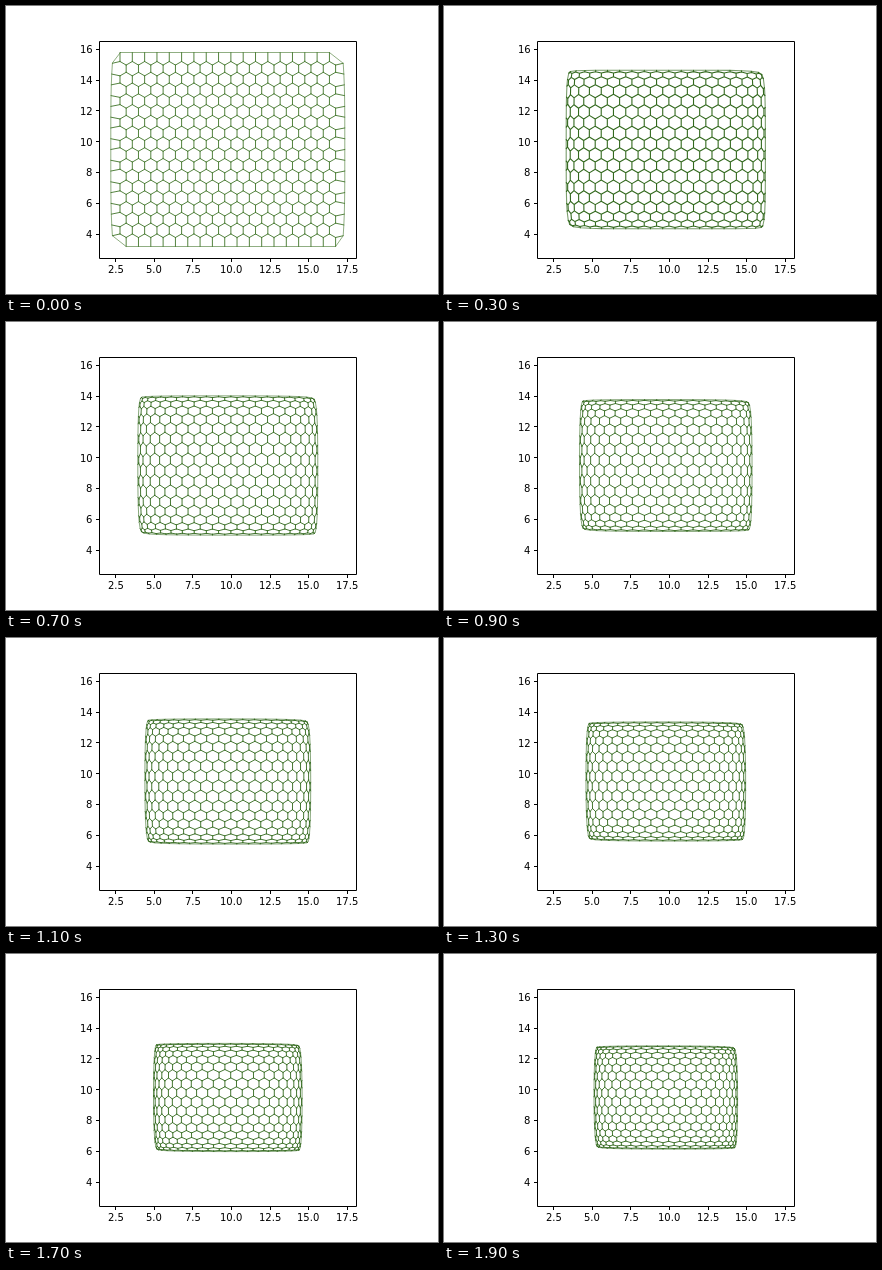
An HTML page with a canvas that plays this animation: 432x288 px, repeating every 2 s.

```html
<!DOCTYPE html>
<html lang="en">
<head>
<meta charset="utf-8">
<title>Contracting cell sheet</title>
<style>
  html, body { margin: 0; width: 100%; height: 100%; overflow: hidden; background: #fff; }
  canvas { display: block; }
</style>
</head>
<body>
<canvas id="stage" width="432" height="288"></canvas>
<script>
const ctx = document.getElementById('stage').getContext('2d');

const STEP_MS = 100, STEPS = 20;
const CX = 221.8, CY = 143.5;
const HALF_W = 117, HALF_H = 97;      // half size of the relaxed sheet
const ROWS = 18, WALLS = 18;          // rows of cells, walls in each row
const PITCH = 12.32, ROW_H = 2 * HALF_H / ROWS, ZIG = 1.78;
const SUBSTEPS = 12, RATE = 2.2 / SUBSTEPS;
const RIM_PULL = 0.5;                 // a rim edge belongs to one cell only

// Relaxed honeycomb: nodes, edges between them, and the closed rim
function buildSheet() {
  const nodes = [], edges = [], rim = [];
  const addNode = (x, y) => nodes.push({ x, y, fx: 0, fy: 0 }) - 1;
  const link = (a, b, pull) => edges.push({ a, b, pull });
  const seamY = j => -HALF_H + j * ROW_H;
  const walls = [];

  for (let row = 0; row < ROWS; row++) {
    const y0 = row === 0 ? -HALF_H : seamY(row) + ZIG;
    const y1 = row === ROWS - 1 ? HALF_H : seamY(row + 1) - ZIG;
    walls.push([]);
    for (let k = 0; k < WALLS; k++) {
      const x = -107.8 + PITCH * (k + (row % 2) / 2);
      const wall = { top: addNode(x, y0), bottom: addNode(x, y1) };
      walls[row].push(wall);
      link(wall.top, wall.bottom, 1);
    }
  }

  const left = [], right = [];
  for (let j = 1; j < ROWS; j++) {
    const y = seamY(j);
    const sideX = HALF_W * (1 - 0.022 * (y / HALF_H) ** 4);
    const seam = [addNode(-sideX, y)];
    for (let k = 0; k < WALLS; k++) {
      const pair = [walls[j - 1][k].bottom, walls[j][k].top];
      seam.push(...(j % 2 ? pair : pair.reverse()));
    }
    seam.push(addNode(sideX, y));
    for (let i = 1; i < seam.length; i++) link(seam[i - 1], seam[i], 1);
    left.push(seam[0]);
    right.push(seam[seam.length - 1]);
  }

  rim.push(...walls[0].map(w => w.top), ...right,
           ...walls[ROWS - 1].map(w => w.bottom).reverse(), ...left.reverse());
  rim.forEach((a, i) => link(a, rim[(i + 1) % rim.length], RIM_PULL));
  return { nodes, edges, rim };
}

// Every edge acts as a spring that pulls its ends together
function relax({ nodes, edges }) {
  for (const { a, b, pull } of edges) {
    const p = nodes[a], q = nodes[b];
    const fx = (q.x - p.x) * pull, fy = (q.y - p.y) * pull;
    p.fx += fx; p.fy += fy;
    q.fx -= fx; q.fy -= fy;
  }
  for (const p of nodes) {
    p.x += RATE * p.fx;
    p.y += RATE * p.fy;
    p.fx = p.fy = 0;
  }
}

const sheet = buildSheet();
const poses = [];
for (let n = 0; n < STEPS; n++) {
  poses.push(sheet.nodes.map(p => [CX + p.x, CY + p.y]));
  for (let i = 0; i < SUBSTEPS; i++) relax(sheet);
}
const innerEdges = sheet.edges.filter(e => e.pull === 1);

function drawSheet(n) {
  const pose = poses[n];
  const strong = n >= 1 && n <= 6;
  ctx.lineJoin = ctx.lineCap = 'round';
  ctx.strokeStyle = n ? '#33691e' : '#41752a';
  ctx.lineWidth = strong ? 1.1 : 0.9;

  ctx.beginPath();
  for (const { a, b } of innerEdges) {
    ctx.moveTo(...pose[a]);
    ctx.lineTo(...pose[b]);
  }
  ctx.stroke();

  ctx.globalAlpha = 0.65;
  ctx.beginPath();
  for (const i of sheet.rim) ctx.lineTo(...pose[i]);
  ctx.closePath();
  ctx.stroke();
  ctx.globalAlpha = 1;
}

function drawAxes() {
  ctx.strokeStyle = ctx.fillStyle = '#000';
  ctx.lineWidth = 1;
  ctx.lineCap = 'butt';
  ctx.lineJoin = 'miter';
  ctx.font = '10px "DejaVu Sans", sans-serif';
  const label = (text, x, y, align) => {
    const start = x - ctx.measureText(text).width * align;
    ctx.fillText(text, Math.round(start), Math.round(y));
  };
  ctx.beginPath();
  ctx.rect(93.5, 35.5, 257, 217);
  for (let i = 0; i < 7; i++) {
    const x = 109.8 + 38.55 * i, px = Math.floor(x) + 0.5;
    ctx.moveTo(px, 252.5);
    ctx.lineTo(px, 256);
    label((2.5 * (i + 1)).toFixed(1), x, 267, 0.5);

    const y = 43.2 + 30.84 * i, py = Math.floor(y) + 0.5;
    ctx.moveTo(93.5, py);
    ctx.lineTo(90, py);
    label(String(16 - 2 * i), 86.5, y + 3.8, 1);
  }
  ctx.stroke();
}

function frame() {
  const n = Math.floor(performance.now() / STEP_MS) % STEPS;
  ctx.fillStyle = '#fff';
  ctx.fillRect(0, 0, 432, 288);
  drawSheet(n);
  drawAxes();
  requestAnimationFrame(frame);
}

frame();
</script>
</body>
</html>
```
